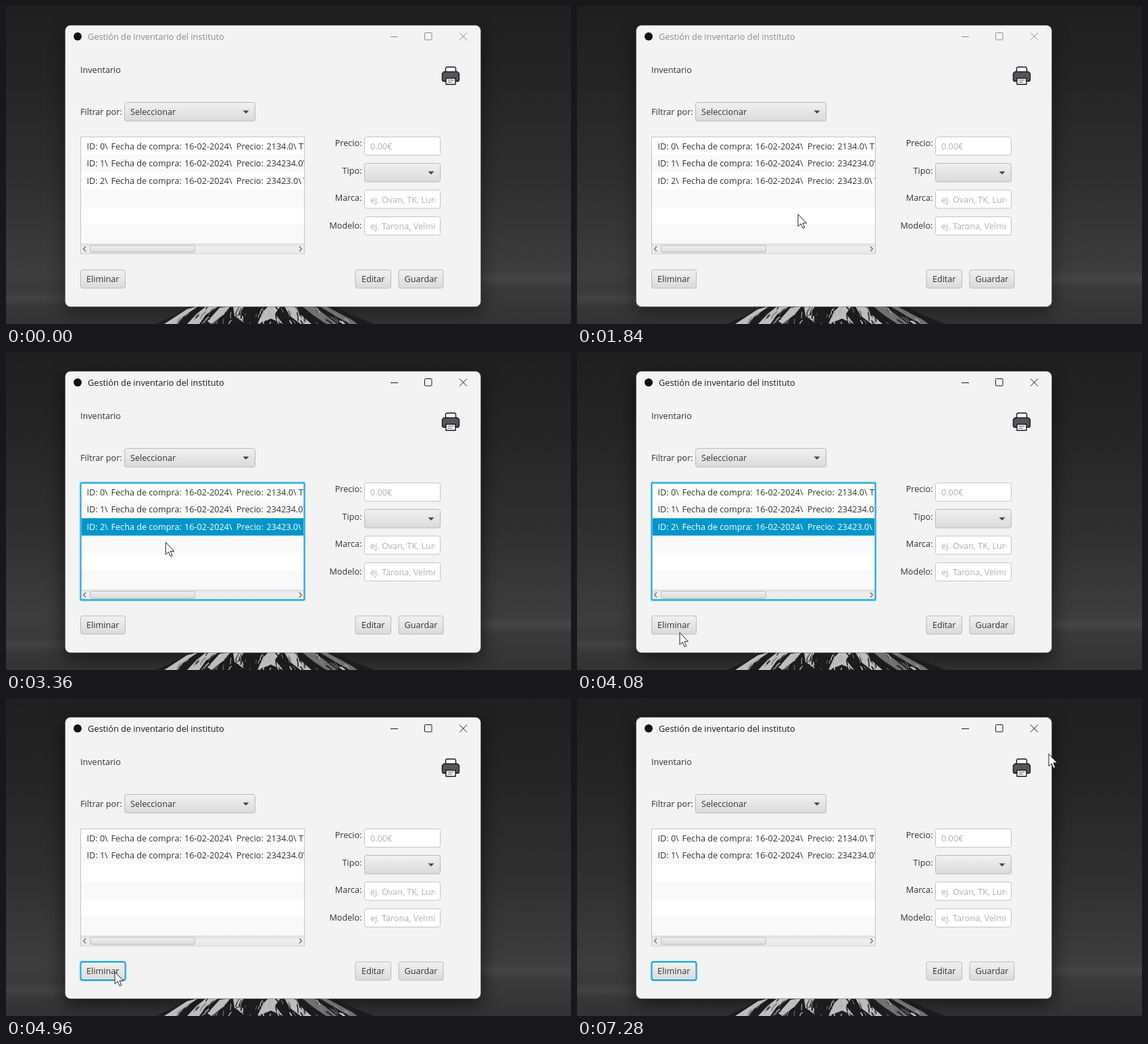
Write an HTML page that moves like this. It is 836 by 470 pixels and loops after 7360 ms.

```html
<!DOCTYPE html>
<html lang="es">
<head>
<meta charset="utf-8">
<title>Gestión de inventario</title>
<style>
  html, body { margin: 0; width: 100%; height: 100%; overflow: hidden; background: #2a2a2a; }
  svg { display: block; width: 100%; height: 100%; }
  text { font: 12.65px "Open Sans", "Noto Sans", sans-serif; fill: #333; white-space: pre; }
  .title { font-size: 12.75px; fill: #8c8c8c; }
  .caption { fill: none; stroke: #8c8c8c; }
  .active .title { fill: #1b1b1b; }
  .active .caption { stroke: #1b1b1b; }
  .shadow { opacity: .4; }
  .active .shadow { opacity: .55; }
  .button { fill: url(#buttonFill); stroke: #b9b9b9; }
  .field { fill: #fff; stroke: #c4c4c4; }
  .prompt { fill: #b1b1b1; }
  .middle { text-anchor: middle; }
  .end { text-anchor: end; }
  .ring { fill: none; stroke: #1aa3d2; stroke-width: 1.8; visibility: hidden; }
  .glow { fill: none; stroke: #bfe4f1; stroke-width: 3.6; visibility: hidden; }
  .listFocus .listRing, .buttonFocus .buttonRing { visibility: visible; }
  .selection { fill: none; }
  .selected .selection { fill: #d3d3d3; }
  .listFocus .selection { fill: #0096c9; }
  .listFocus .last text { fill: #fff; }
  .removed .last { display: none; }
  .pressed .delete { fill: url(#pressedFill); }
</style>
</head>
<body>
<svg id="stage" viewBox="0 0 836 470" preserveAspectRatio="none">
  <defs>
    <linearGradient id="sky" x2="0" y2="1">
      <stop offset="0" stop-color="#1f1f1f"/>
      <stop offset=".25" stop-color="#252525"/>
      <stop offset=".55" stop-color="#2f2f2f"/>
      <stop offset=".84" stop-color="#3d3d3d"/>
      <stop offset="1" stop-color="#333"/>
    </linearGradient>
    <linearGradient id="buttonFill" x2="0" y2="1">
      <stop offset="0" stop-color="#f1f1f1"/>
      <stop offset="1" stop-color="#dadada"/>
    </linearGradient>
    <linearGradient id="pressedFill" x2="0" y2="1">
      <stop offset="0" stop-color="#d8d8d8"/>
      <stop offset="1" stop-color="#c6c6c6"/>
    </linearGradient>
    <linearGradient id="trackFill" x2="0" y2="1">
      <stop offset="0" stop-color="#dedede"/>
      <stop offset=".4" stop-color="#efefef"/>
      <stop offset="1" stop-color="#e8e8e8"/>
    </linearGradient>
    <filter id="blur" x="-30%" y="-30%" width="160%" height="160%"><feGaussianBlur stdDeviation="13"/></filter>
    <filter id="haze" x="-30%" y="-200%" width="160%" height="500%"><feGaussianBlur stdDeviation="16 5"/></filter>
    <clipPath id="listClip"><rect x="111" y="194" width="330" height="157"/></clipPath>
    <clipPath id="fieldClip"><rect x="538" y="190" width="97.5" height="150"/></clipPath>
  </defs>

  <rect width="836" height="470" fill="url(#sky)"/>
  <g fill="#666" opacity=".3" filter="url(#haze)">
    <rect x="690" y="398" width="170" height="10"/>
    <rect x="-20" y="427" width="150" height="10"/>
  </g>
  <rect class="shadow" x="86" y="36" width="618" height="418" rx="10" filter="url(#blur)"/>

  <path d="M222 470L250 457L278 440H480L510 456L545 470Z" fill="#1c1c1c"/>
  <path d="M234 470L268 448L284 444L262 459L254 470ZM268 470L282 455L296 444H314L296 456L286 470Z
    M298 466L316 446L332 444L322 456L304 470ZM336 444H352L345 455L352 468L338 458Z
    M372 470L380 452L388 444H406L398 455L410 470L392 462ZM412 444H430L436 456L452 470H436L420 458Z" fill="#bdbdbd"/>
  <path d="M438 444H456L472 456L490 470H474L456 458ZM464 444H474L512 464L520 470H508Z" fill="#707070"/>
  <g id="snow" fill="none" stroke-linecap="round"></g>

  <rect x="87.5" y="28.5" width="615" height="416" rx="8" fill="#f3f3f3" stroke="#555" stroke-opacity=".5"/>
  <circle cx="106" cy="45" r="6" fill="#111"/>
  <text class="title" x="121" y="50">Gestión de inventario del instituto</text>
  <path class="caption" d="M569 45.5H580M671 39.5L682 50.5M682 39.5L671 50.5"/>
  <rect class="caption" x="619.5" y="39.5" width="10.5" height="10.5" rx="1"/>

  <g stroke="#17171f" stroke-width="1.4" transform="translate(0 .7)">
    <path d="M650.5 97V91L652 89.5H664L665.5 91V97Z" fill="#fff"/>
    <path d="M648 96.5H668L670.5 99V109L669 110.5H647L645.5 109V99Z" fill="#55555b"/>
    <path d="M651 106H665V115H651Z" fill="#fff"/>
    <path d="M653.5 109H662.5M653.5 111.8H660" stroke="#55506e" stroke-width="1"/>
  </g>

  <text x="110" y="99">Inventario</text>
  <text x="110" y="161">Filtrar por:</text>
  <rect class="button" x="175.5" y="142.5" width="193" height="27.5" rx="3"/>
  <text x="184" y="161">Seleccionar</text>
  <path d="M350.5 154.5H359.5L355 159Z" fill="#444"/>

  <rect class="field" x="110.5" y="193.5" width="331" height="173"/>
  <path d="M111 219.8h330v25.8h-330zM111 271.4h330v25.8h-330zM111 323h330v28h-330z" fill="#f9f9f9"/>
  <g clip-path="url(#listClip)" id="rows"></g>
  <rect x="111" y="351" width="330" height="15.5" fill="url(#trackFill)"/>
  <rect x="124.5" y="353.8" width="155" height="10.4" rx="2.5" class="button"/>
  <path d="M118 355.5L114.5 359L118 362.5M434 355.5L437.5 359L434 362.5" fill="none" stroke="#666" stroke-width="1.2"/>
  <rect class="glow listRing" x="110" y="193" width="332" height="174" rx="1"/>
  <rect class="ring listRing" x="110.5" y="193.5" width="331" height="173" rx="1"/>

  <g class="end">
    <text x="526.5" y="207">Precio:</text>
    <text x="526.5" y="248">Tipo:</text>
    <text x="526.5" y="288">Marca:</text>
    <text x="526.5" y="328.5">Modelo:</text>
  </g>
  <rect class="field" x="530.5" y="193.5" width="112" height="27" rx="3"/>
  <rect class="button" x="530.5" y="232.5" width="112" height="27.5" rx="3"/>
  <path d="M624.5 244.5H633.5L629 249Z" fill="#444"/>
  <rect class="field" x="530.5" y="272" width="112" height="27" rx="3"/>
  <rect class="field" x="530.5" y="311.5" width="112" height="27" rx="3"/>
  <g clip-path="url(#fieldClip)">
    <text class="prompt" x="539" y="212">0.00€</text>
    <text class="prompt" x="539" y="290.5">ej. Ovan, TK, Luro</text>
    <text class="prompt" x="539" y="330">ej. Tarona, Velmik</text>
  </g>

  <rect class="button delete" x="110.5" y="390" width="66" height="27" rx="3"/>
  <rect class="glow buttonRing" x="110" y="389.5" width="67" height="28" rx="3.5"/>
  <rect class="ring buttonRing" x="110.5" y="390" width="66" height="27" rx="3"/>
  <rect class="button" x="517" y="390" width="52.5" height="27" rx="3"/>
  <rect class="button" x="581" y="390" width="66" height="27" rx="3"/>
  <g class="middle">
    <text x="143.2" y="408">Eliminar</text>
    <text x="543.2" y="408">Editar</text>
    <text x="614" y="408">Guardar</text>
  </g>

  <path id="cursor" d="M0 -.3V17.6L4.2 13.9L7.1 20.6L9.8 19.4L7 12.9H12.6Z" fill="#fff" stroke="#222" stroke-linejoin="round"/>
</svg>
<script>
  const STEP = 80, STEPS = 92;
  const stage = document.getElementById('stage');
  const cursor = document.getElementById('cursor');

  const prices = [['2134.0\\', 433], ['234234.0\\', 447.5], ['23423.0\\', 439.8]];
  document.getElementById('rows').innerHTML = prices.map(([price, typeX], id) => {
    const y = 211.5 + id * 25.8;
    return `<g class="${id === 2 ? 'last' : ''}">
      ${id === 2 ? '<rect class="selection" x="111" y="245.6" width="330" height="25.8"/>' : ''}
      <text y="${y}"><tspan x="119.5">ID: ${id}\\</tspan><tspan x="155.5">Fecha de compra:</tspan><tspan
        x="264">16-02-2024\\</tspan><tspan x="341">Precio:</tspan><tspan
        x="385.5">${price}</tspan><tspan x="${typeX}">Tipo</tspan></text></g>`;
  }).join('');

  // Rock and snow streaks run down from the hidden summit.
  let seed = 11;
  const random = () => (seed = seed * 16807 % 2147483647) / 2147483647;
  document.getElementById('snow').innerHTML = Array.from({ length: 90 }, () => {
    const side = random() * 2 - 1;
    const y = 443 + random() * 26;
    const x = 378 + side * (85 + (y - 443) * 2);
    const slope = side * 1.5 + random() * 1.2 - .6;
    const length = 3 + random() * 9;
    const tone = Math.round(random() < .45 ? 30 : 80 + random() * 130);
    return `<path d="M${x} ${y}l${slope * length * .5} ${length * .5}l${slope * length * .2} ${length * .5}"
      stroke="rgb(${tone},${tone},${tone})" stroke-width="${.6 + random() * 1.4}"/>`;
  }).join('');

  // Pointer stops: step, x, y.
  const path = [
    [14, 790, 330], [18, 480, 328], [21, 360, 313], [23, 327, 308], [26, 315, 302],
    [34, 250, 263], [36, 249, 261], [41, 249, 261], [48, 160, 405], [50, 152, 416],
    [51, 152, 415], [57, 160, 406], [62, 161, 405], [64, 170, 404], [71, 448, 367],
    [80, 560, 250], [88, 690, 100], [90, 697, 87], [91, 698, 83]
  ];

  function pointerAt(step) {
    const i = path.findIndex(stop => stop[0] >= step);
    const [endStep, endX, endY] = path[i];
    const [startStep, startX, startY] = path[Math.max(0, i - 1)];
    const part = endStep === startStep ? 1 : (step - startStep) / (endStep - startStep);
    return [startX + (endX - startX) * part, startY + (endY - startY) * part];
  }

  function draw(now) {
    const step = Math.floor(now / STEP) % STEPS;
    const state = {
      active: step >= 38,
      selected: step >= 38 && step < 61,
      listFocus: step >= 38 && step < 59,
      buttonFocus: step >= 59,
      pressed: step >= 59 && step < 61,
      removed: step >= 61
    };
    for (const name in state) stage.classList.toggle(name, state[name]);

    const visible = step >= path[0][0];
    cursor.style.visibility = visible ? 'visible' : 'hidden';
    if (visible) cursor.setAttribute('transform', `translate(${pointerAt(step)})`);
  }

  const start = performance.now();
  function tick() {
    draw(performance.now() - start);
    requestAnimationFrame(tick);
  }
  tick();
</script>
</body>
</html>
```
